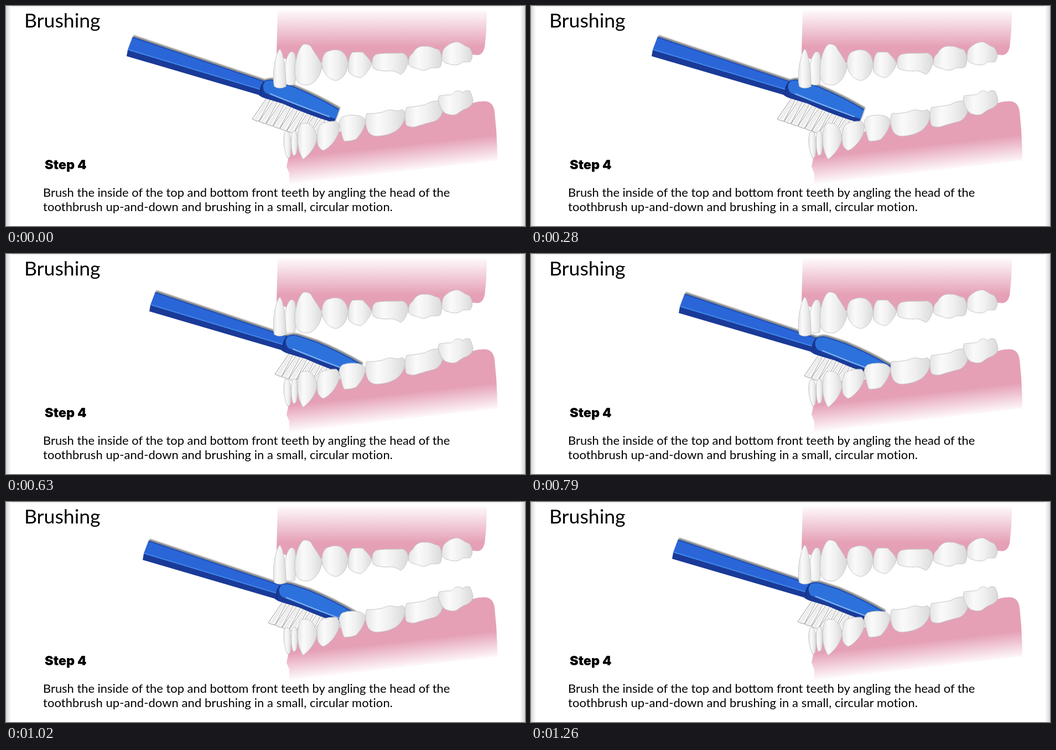
Recreate the animation shown at these times as an HTML page. Size 938 px wide and 399 px high, loop 1330 ms.

```html
<!DOCTYPE html>
<html lang="en">
<head>
<meta charset="utf-8">
<title>Brushing</title>
<style>
html, body { margin: 0; width: 100%; height: 100%; overflow: hidden; background: #fff; }
svg { display: block; width: 938px; height: 399px; }
text { font-family: Lato, sans-serif; }
.body { font-size: 21.9px; }
.teeth path { fill: url(#enamel); stroke: #c6c6c6; }
#tufts path { fill: #f8f8f8; stroke: #9a9a9a; }
#tufts .hair { fill: none; stroke: #d8d8d8; }
.handle { filter: drop-shadow(2px -3px 1px #0007); }
</style>
</head>
<body>
<svg viewBox="0 0 938 399">
  <defs>
    <linearGradient id="enamel">
      <stop offset="0" stop-color="#e6e6e6"/>
      <stop offset=".3" stop-color="#fafafa"/>
      <stop offset=".6" stop-color="#f0f0f0"/>
      <stop offset="1" stop-color="#dadada"/>
    </linearGradient>
    <linearGradient id="upperGum" gradientUnits="userSpaceOnUse" x1="0" y1="4" x2="0" y2="74">
      <stop offset="0" stop-color="#fff"/>
      <stop offset="1" stop-color="#e5a0b6"/>
    </linearGradient>
    <linearGradient id="lowerGum" gradientUnits="userSpaceOnUse" x1="700" y1="254" x2="705.5" y2="304">
      <stop offset="0" stop-color="#e5a0b6"/>
      <stop offset="1" stop-color="#fff"/>
    </linearGradient>
    <linearGradient id="edge">
      <stop offset="0" stop-color="#d4d4d4"/>
      <stop offset="1" stop-color="#fff"/>
    </linearGradient>
  </defs>

  <rect width="938" height="2" fill="#f0f0f0"/>
  <rect id="side" width="9" height="399" fill="url(#edge)"/>
  <use href="#side" transform="matrix(-1 0 0 1 938 0)"/>

  <path fill="url(#upperGum)" d="M491 8H869Q869 40 866 66Q865 89 851 89L842 88L788 94L727 98L661 103L618 103L571 103L522 100L504 96L489 86Z"/>

  <g id="brush">
    <g id="tufts"></g>
    <g class="handle">
      <path fill="#1a3a98" d="M229 56L466 136Q478 131 490 136L520 146Q565 165 602 187L593 212Q545 197 500 177L470 168Q462 166 456 161L218 91L220 80Z"/>
      <path fill="#2a66d8" d="M229 56L466 136L460 152L220 80Z"/>
      <path fill="#2d72dc" d="M466 136Q478 131 490 136L520 146Q565 165 602 187L596 205Q540 187 470 158Q462 152 466 136Z"/>
    </g>
    <g fill="none">
      <path stroke="#1d4ab4" stroke-width="1.5" d="M229 57L466 137Q478 132 490 137L520 147Q565 166 601 188"/>
      <path stroke="#3f84e4" stroke-width="2" d="M221 79L459 151"/>
      <path stroke="#7db1ee" stroke-width="2" d="M477 159Q530 181 585 201"/>
      <path stroke="#173485" stroke-width="2.5" d="M467 137Q457 149 461 161"/>
    </g>
  </g>

  <path fill="url(#lowerGum)" d="M504 256L527 247L562 240L602 228L650 214L721 202L788 186L843 176Q856 172 868 173Q881 175 883 192Q888 235 888 280L512 323L512 304L507 291L510 278Z"/>

  <g class="teeth">
    <path d="M515 83C506 88 499 122 502 139Q510 146 522 142Q527 110 522 87Q519 82 515 83Z"/>
    <path d="M495 78C487 84 480 128 485 146Q494 152 506 146C506 118 502 86 495 78Z"/>
    <path d="M540 69C530 70 521 100 522 121C523 140 532 144 547 143C560 139 567 128 571 112C570 98 556 84 551 73Q546 69 540 69Z"/>
    <path d="M583 82C574 84 571 95 571 106C572 122 586 136 598 135C612 130 617 118 618 105C618 93 610 81 600 80Q592 78 583 82Z"/>
    <path d="M626 84C619 90 618 108 619 119C624 126 634 129 641 130C650 125 658 114 661 104C656 94 650 90 645 84Q636 83 626 84Z"/>
    <path d="M668 88C682 84 702 87 715 85Q726 87 727 101C724 112 720 120 714 124C705 120 700 116 692 118C682 118 668 117 663 112Q659 94 668 88Z"/>
    <path d="M735 86C740 76 748 72 757 73C768 72 774 78 782 79C788 86 789 102 785 110C778 115 772 110 766 113C758 118 752 117 745 114C737 112 731 111 728 107C726 98 729 90 735 86Z"/>
    <path d="M791 78C798 70 808 65 816 65C824 67 830 74 837 75C844 84 844 94 839 101C832 103 826 99 822 104C815 109 806 107 797 104Q790 102 788 97Q787 86 791 78Z"/>

    <path d="M504 229C500 240 502 262 509 276Q513 276 514 270C516 255 515 238 512 230Q508 226 504 229Z"/>
    <path d="M519 227C514 234 514 258 519 271Q523 272 525 266C528 250 527 236 524 227Z"/>
    <path d="M533 214C527 224 526 240 528 254Q531 270 537 278C550 268 560 254 562 240C561 226 553 215 546 213Q538 212 533 214Z"/>
    <path d="M568 215C561 225 561 242 564 253Q568 261 574 262C586 256 598 242 602 226Q604 214 597 209Q580 208 568 215Z"/>
    <path d="M608 201Q602 206 602 215C606 225 607 238 611 245Q622 246 632 242C640 234 647 224 650 208Q646 201 638 199Q622 196 608 201Z"/>
    <path d="M652 195C648 206 650 222 656 230Q663 237 672 236Q690 235 704 227C714 220 720 210 721 200Q722 190 716 188Q710 191 704 190Q692 186 682 192Q668 196 652 195Z"/>
    <path d="M724 184C720 192 720 208 724 217Q735 222 746 217Q762 212 775 209Q785 204 789 192C786 184 786 175 781 172Q768 172 758 179Q744 182 724 184Z"/>
    <path d="M783 163Q780 168 782 175C786 186 790 194 798 196Q808 199 815 196Q824 188 834 185Q844 180 844 171Q842 160 838 154Q830 152 826 157Q818 152 812 155Q806 163 798 161Z"/>
  </g>

  <text x="33" y="39" font-size="35.6">Brushing</text>
  <text x="70" y="296" style="font: 900 23.5px Inter, sans-serif">Step 4</text>
  <text class="body" x="67" y="346">Brush the inside of the top and bottom front teeth by angling the head of the</text>
  <text class="body" x="67" y="372" letter-spacing=".12">toothbrush up-and-down and brushing in a small, circular motion.</text>
</svg>

<script>
const LOOP = 1330;
// Start time in ms, then the brush offset
const poses = [
  [0, 0, 0], [50, -11, -4], [130, -22, -7], [210, -11, -4],
  [280, 0, 0], [380, 11, 4], [480, 23, 7], [530, 32, 10],
  [630, 41, 13], [710, 46, 15], [790, 49, 16], [870, 43, 16],
  [950, 36, 15], [1020, 29, 14], [1120, 19, 7], [1200, 28, 9], [1260, 37, 12]
];
const brush = document.getElementById("brush");

let tufts = "";
for (let i = 0; i < 9; i++) {
  const x = 473 + 12.5 * i, y = 164 + 4.3 * i;
  tufts += `<path d="M${x} ${y}l7 2l-23 43q-5 0 -12 -4z"/>`;
  for (const d of [2.5, 5])
    tufts += `<path class="hair" d="M${x + d} ${y + d / 3}l-26 41"/>`;
}
document.getElementById("tufts").innerHTML = tufts;

function draw() {
  const t = performance.now() % LOOP;
  const [, x, y] = poses.findLast(pose => pose[0] <= t);
  brush.setAttribute("transform", `translate(${x} ${y})`);
  requestAnimationFrame(draw);
}
draw();
</script>
</body>
</html>
```
